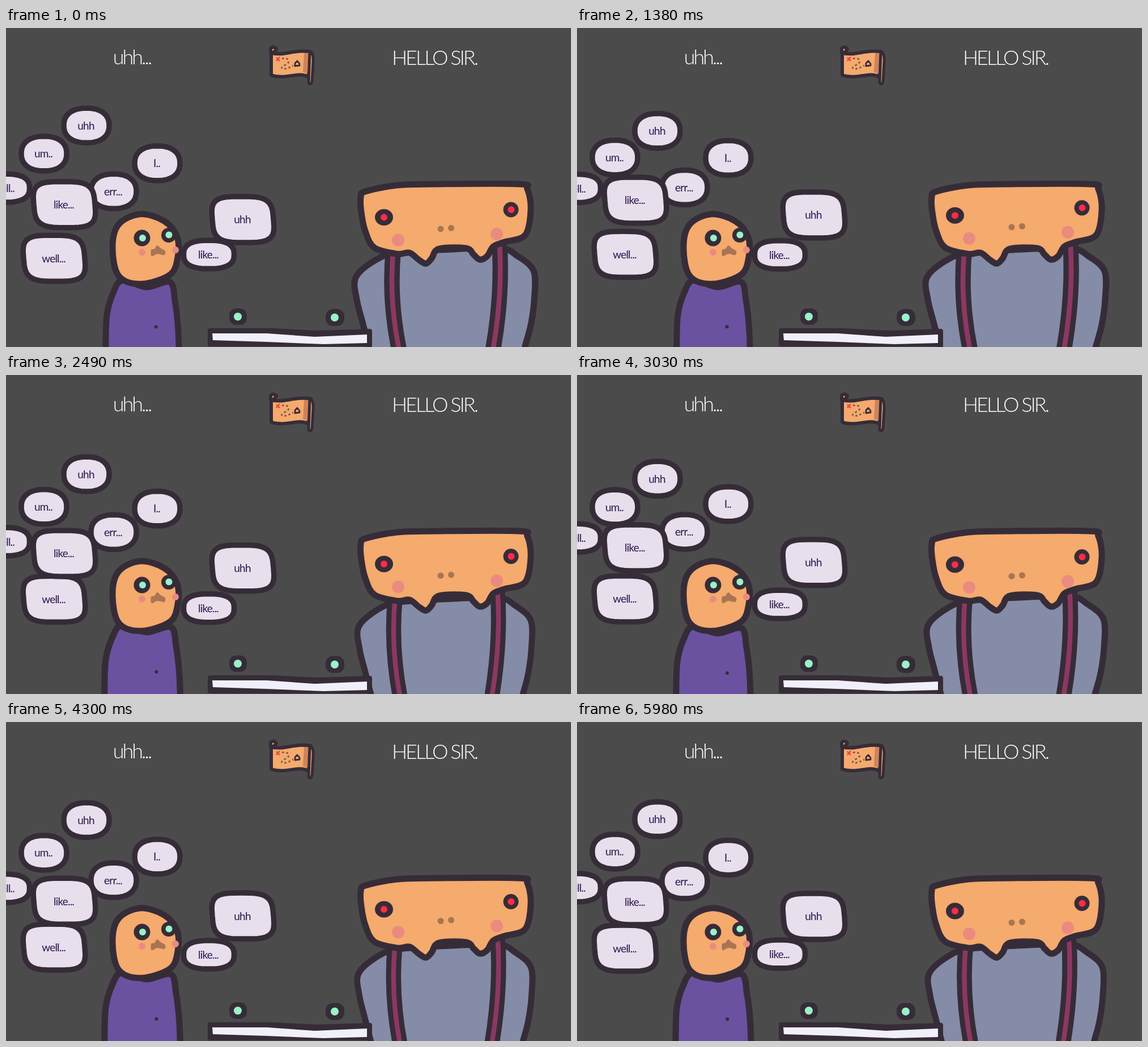
An HTML page for the animation above (6.08 s loop, 997 by 562 pixels).

```html
<!DOCTYPE html>
<html lang="en">
<head>
<meta charset="utf-8">
<title>Awkward chat</title>
<style>
  html, body { margin: 0; width: 100%; height: 100%; overflow: hidden; background: #4b4b4b; }
  svg { display: block; width: 100%; height: 100%; }
  .ink { stroke: #362c38; stroke-width: 11; stroke-linejoin: round; fill: none; }
  .thin { stroke-width: 6; }
  .dark { fill: #362c38; }
  .skin { fill: #f5aa6e; }
  .robe { fill: #6a52a0; }
  .suit { fill: #858ca8; }
  .cheek { fill: #ea8b80; }
  .brown { fill: #a97552; }
  .mint { fill: #99f2c9; }
  .red { fill: #fd2c48; }
  .strap { stroke-width: 27; }
  .band { stroke: #8c3862; stroke-width: 8.5; fill: none; }
  .bubble { fill: #e8dfec; stroke-width: 9.5; }
  text { font-family: Lato, "Open Sans", sans-serif; text-anchor: middle; }
  .say { font-size: 19px; letter-spacing: -.8px; fill: #2a1650; }
  .title { font-size: 36px; font-weight: 300; letter-spacing: -3px; fill: #fff; }
</style>
</head>
<body>
<svg viewBox="0 0 997 562">
  <text class="title" x="222" y="64">uhh...</text>
  <text class="title" x="756" y="65">HELLO SIR.</text>

  <!-- map -->
  <path class="ink thin skin" d="M467 43V36Q472 31 477 37L473 43Z"/>
  <path class="ink thin skin" d="M468 44C490 50 508 37 538 42L533 86C515 76 492 92 468 83Z"/>
  <path fill="#cf835a" d="M526 44H533V80L524 78Z"/>
  <path class="ink skin" stroke-width="5" style="stroke-width:5" d="M536 41Q543 44 542 60L540 94Q538 101 534 97Z"/>
  <path class="ink" style="stroke:#f0443f;stroke-width:2.5" d="M477 52L483 58M483 51L477 58"/>
  <path class="ink" style="stroke:#7a5746;stroke-width:2.8;stroke-dasharray:3.5 4" d="M487 54C498 51 504 60 493 65C480 71 488 77 507 66"/>
  <path class="ink" style="stroke-width:2.8" d="M510 67V62L514 58L518 63V66Z"/>

  <!-- small fellow -->
  <g id="robe">
    <path class="ink robe" data-key="205,443 248,455 290,446 299,480 304,520 306,562 306,610 175,610 175,562 177,505 188,466"/>
    <circle class="dark" cx="265" cy="525" r="3"/>
  </g>
  <path class="ink skin" data-key="188,388 198,347 236,328 279,340 302,368 303,404 289,435 238,451 199,437"/>
  <circle class="dark" cx="240" cy="370" r="14.5"/>
  <circle class="dark" cx="287" cy="365" r="13"/>
  <circle class="mint" cx="241" cy="370" r="6"/>
  <circle class="mint" cx="287.5" cy="364.5" r="6"/>
  <circle class="cheek" cx="240" cy="395" r="6"/>
  <circle class="cheek" cx="299" cy="391" r="6"/>
  <path class="brown" data-key="256,391 262,389 267,383 273,388 281,393 279,400 267,398 257,402"/>

  <!-- big fellow -->
  <g id="suit">
    <path class="ink suit" data-key="619,442 650,413 690,398 780,392 870,390 900,403 929,430 930,480 924,525 914,562 900,610 655,610 642,562 631,520 621,480"/>
    <path class="ink strap" d="M685 390Q676 480 696 575"/>
    <path class="band" d="M685 390Q676 480 696 575"/>
    <path class="ink strap" d="M869 375Q876 470 857 575"/>
    <path class="band" d="M869 375Q876 470 857 575"/>
  </g>
  <path class="ink skin" data-key="626,298 634,288 690,277 760,275 905,275 920,284 926,320 916,365 880,377 860,385 849,402 836,408 825,399 812,388 764,389 751,406 741,415 728,408 712,396 690,398 650,387 634,358 627,325"/>
  <g id="face">
    <ellipse class="dark" cx="667" cy="332" rx="16" ry="14.5"/>
    <circle class="dark" cx="891" cy="318.5" r="13.5"/>
    <circle class="red" cx="667" cy="332" r="6"/>
    <circle class="red" cx="891.5" cy="318.5" r="6"/>
    <circle class="brown" cx="767" cy="352.5" r="5.5"/>
    <circle class="brown" cx="785.5" cy="351" r="5.5"/>
    <circle class="cheek" cx="692" cy="372.3" r="11"/>
    <circle class="cheek" cx="866" cy="361.5" r="11"/>
  </g>

  <!-- table -->
  <path class="ink dark" style="stroke-width:8" d="M360 533H470L550 537L642 534V557H360Z"/>
  <path fill="#f0effa" d="M364 538L460 538L545 544L637 540V555L560 557L460 553L365 550Z"/>
  <rect class="dark" x="394" y="494" width="31" height="29" rx="12"/>
  <rect class="dark" x="564" y="495" width="33" height="30" rx="13"/>
  <circle class="mint" cx="409" cy="508.5" r="7"/>
  <circle class="mint" cx="580" cy="510" r="7"/>

  <g id="bubbles"></g>
</svg>
<script>
const loop = 6080, step = loop / 49; // the picture is redrawn 49 times per loop
const speed = 197;                   // degrees per second, shared by all bobbing
const get = id => document.getElementById(id);
const wave = deg => Math.cos(deg * Math.PI / 180);
const move = (el, value) => el.setAttribute('transform', value);

// closed curve through key points
function smooth(key) {
  const pts = key.split(' ').map(p => p.split(',').map(Number));
  const at = i => pts[(i + pts.length) % pts.length];
  const lean = (i, k) => at(i).map((v, a) => v + k * (at(i + 1)[a] - at(i - 1)[a]) / 6);
  return 'M' + at(0) + pts.map((_, i) => `C${lean(i, 1)} ${lean(i + 1, -1)} ${at(i + 1)}`).join('') + 'Z';
}

// rounded outline: a higher power is squarer, skew leans it
function outline([w, h, power, skew]) {
  const bend = v => Math.sign(v) * Math.abs(v) ** (2 / power);
  const pts = Array.from({ length: 60 }, (_, i) => {
    const x = w * bend(wave(i * 6)), y = h * bend(wave(i * 6 - 90));
    return [x + skew * y, y].map(v => v.toFixed(1));
  });
  return 'M' + pts.join('L') + 'Z';
}

const round = [40, 30.5, 2.3, 0], box = [54, 40.5, 3.6, 0.08], long = [44.5, 25, 2.6, 0];
const bubbles = [
  { words: 'uhh', shape: round, x: 142, y: 176, phase: 124 },
  { words: 'um..', shape: round, x: 67, y: 228, phase: 174 },
  { words: 'I..', shape: round, x: 267, y: 234, phase: -56 },
  { words: 'well..', shape: long, x: -3, y: 287, phase: 217 },
  { words: 'err...', shape: round, x: 190, y: 281, phase: -6 },
  { words: 'well...', shape: box, x: 85, y: 399, phase: -6 },
  { words: 'like...', shape: box, x: 103, y: 310, phase: -86 },
  { words: 'uhh', shape: box, x: 418, y: 336, phase: -84 },
  { words: 'like...', shape: long, x: 358, y: 404, phase: 217 }
];

document.querySelectorAll('[data-key]').forEach(el => el.setAttribute('d', smooth(el.dataset.key)));
get('bubbles').innerHTML = bubbles.map(b =>
  `<g><path class="ink bubble" d="${outline(b.shape)}"/><text class="say" x="-1" y="7">${b.words}</text></g>`).join('');
const groups = [...get('bubbles').children];

function draw(ms) {
  const t = (Math.floor(ms % loop / step) * step + 30) / 1000;
  bubbles.forEach((b, i) =>
    move(groups[i], `translate(${b.x} ${b.y + 6.7 * wave(speed * t + b.phase)})`));

  const breath = wave(speed * t + 217);
  move(get('robe'), `translate(241 ${-2 * breath}) scale(${1 + 0.02 * breath} 1) translate(-241 0)`);
  move(get('suit'), `translate(774 ${2.5 * breath}) scale(${1 - 0.019 * breath} 1) translate(-774 0)`);
  move(get('face'), `translate(0 ${2 * wave(360 * (t - 0.35) / 2.6)})`);
}

let start;
function tick(now) {
  start ??= now;
  draw(now - start);
  requestAnimationFrame(tick);
}
draw(0);
requestAnimationFrame(tick);
</script>
</body>
</html>
```
